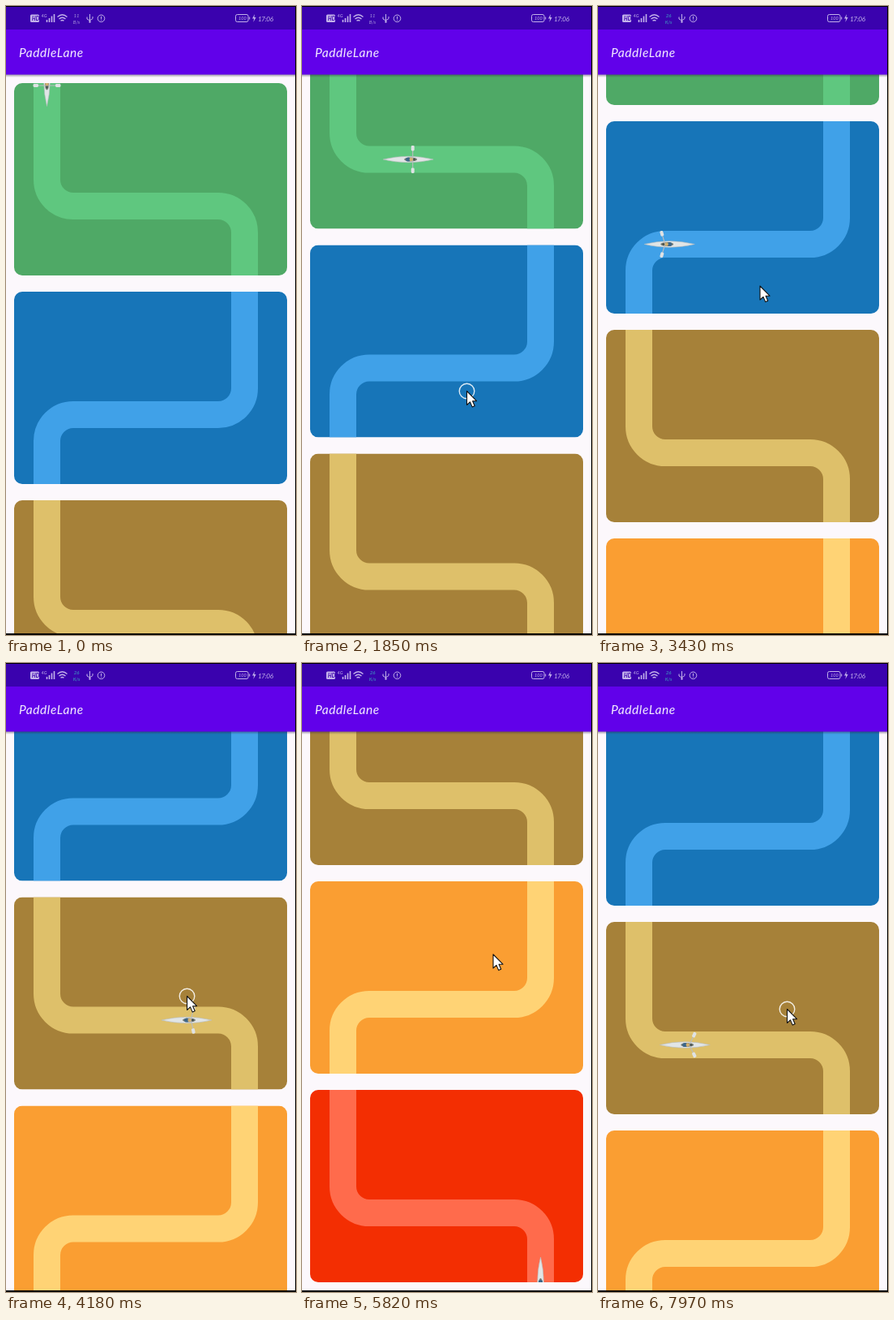
Recreate the animation shown at these times as an HTML page. Size 358 px wide and 775 px high, loop 8 s.

```html
<!DOCTYPE html>
<html lang="en">
<head>
<meta charset="utf-8">
<style>
  html, body { margin: 0; width: 100%; height: 100%; overflow: hidden; background: #fcf8fc; }
  svg { display: block; width: 100vw; height: 100vh; }
  text { font-family: Lato, "Open Sans", sans-serif; font-style: italic; }
</style>
</head>
<body>
<svg id="stage" viewBox="0 0 358 775">
  <defs>
    <clipPath id="cardClip"><rect width="337" height="237" rx="10"/></clipPath>
    <linearGradient id="shade" x2="0" y2="1">
      <stop offset="0" stop-color="#322646" stop-opacity=".5"/>
      <stop offset="1" stop-color="#322646" stop-opacity="0"/>
    </linearGradient>
    <g id="oar">
      <path d="M0 0V14" stroke="#b9bcc0" stroke-width="1.1"/>
      <rect x="-2" y="10.5" width="4" height="6.5" rx="1.4" fill="#dfe2e4"/>
    </g>
  </defs>
  <rect width="358" height="775" fill="#fcf8fc"/>
  <g id="list"></g>

  <rect y="84" width="358" height="4" fill="url(#shade)"/>
  <rect y="28" width="358" height="56.5" fill="#6101ea"/>
  <rect width="358" height="29" fill="#3a02ae"/>
  <text x="16" y="63" font-size="15.5" letter-spacing=".6" fill="#f3ebff">PaddleLane</text>

  <g fill="none" stroke="#c3b2ea" stroke-width="1">
    <rect x="30" y="10.5" width="11" height="9.5" rx="1.5" fill="#c3b2ea" stroke="none"/>
    <path d="M50.5 20V17M53.5 20V15M56.5 20V12.5M59.5 20V10" stroke-width="1.6"/>
    <path d="M63.5 13.5Q69.5 8 75.5 13.5M65.5 16Q69.5 12.5 73.5 16M67.5 18.3Q69.5 16.7 71.5 18.3" stroke-width="1.3"/>
    <path d="M103.5 10V20M100 13.5V16L103.5 18L107 15.5V13"/>
    <circle cx="103.5" cy="19.5" r=".9"/>
    <circle cx="117.5" cy="15.3" r="4.3"/>
    <path d="M117.5 12.8V16.2M117.5 17.2V18"/>
    <rect x="283.5" y="10.5" width="15.5" height="9" rx="2"/>
    <path d="M300.7 13.5V16.5"/>
    <path d="M307 10L304 15.6H306.2L305.3 20L308.6 14H306.4Z" fill="#c3b2ea" stroke="none"/>
  </g>
  <g fill="#c3b2ea">
    <text x="32" y="18" font-size="6.5" font-weight="700" fill="#3a02ae">HD</text>
    <text x="43.5" y="14" font-size="5.5">4G</text>
    <text x="287" y="17.3" font-size="5.5">100</text>
    <text x="311" y="18.5" font-size="8.2" letter-spacing="-.4">17:06</text>
  </g>
  <g id="speed" text-anchor="middle">
    <text id="rate" x="87" y="14" font-size="6">11</text>
    <text id="unit" x="87" y="22" font-size="6">B/s</text>
  </g>

  <path d="M0 .5H358M357.5 0V775M0 774H358" stroke="#000" fill="none"/>
  <rect y="773" width="358" height="2"/>

  <g id="pointer">
    <circle id="touch" r="9.3" fill="none" stroke="#fff" stroke-opacity=".85" stroke-width="1.4"/>
    <path d="M0 0V17L4 13.4L6.7 19.6L9.7 18.2L7.1 12.2H12Z" fill="#fff" stroke="#111" stroke-width="1.1" stroke-linejoin="round"/>
  </g>
</svg>
<script>
const NS = "http://www.w3.org/2000/svg";
const $ = id => document.getElementById(id);
const LOOP = 8000, PITCH = 257, MAX_SCROLL = 597;
const COLORS = [
  ["#4fa966", "#5fc77f"], ["#1775b8", "#40a1e8"], ["#a68139", "#dec06a"],
  ["#fa9e32", "#ffd375"], ["#f32e02", "#ff6b4c"]
];
const RIGHTWARD = "M40.5 0V119A32.5 32.5 0 0 0 73 151.5H252A32.5 32.5 0 0 1 284.5 184V237";
const LEFTWARD = "M284.5 0V119A32.5 32.5 0 0 1 252 151.5H73A32.5 32.5 0 0 0 40.5 184V237";

// Screen refreshes: first time, last time, count
const BURSTS = [
  [0, 0, 1], [70, 1090, 10], [1150, 1850, 5], [2470, 2920, 4], [3090, 3430, 3],
  [3710, 3860, 2], [4180, 4380, 2], [4570, 4940, 3], [5190, 5190, 1], [5820, 5820, 1],
  [6230, 6540, 3], [6840, 6970, 2], [7150, 7150, 1], [7420, 7970, 4]
];
// Time, scroll offset
const SCROLL = [
  [0, 0], [180, 0], [1090, 32], [1850, 57.5], [2320, 57.5], [2770, 105], [3430, 210],
  [3710, 250], [4180, 320.5], [4940, 516.5], [5190, 595], [5820, 597], [6100, 597],
  [6540, 568], [6840, 528], [7150, 475], [7420, 405], [7970, 290]
];
// Time, pointer x, pointer y
const POINTER = [
  [70, 204, 532], [180, 204, 532], [1090, 204, 500], [1850, 203.5, 474.5],
  [2320, 203.5, 474.5], [2770, 202.5, 432.5], [3430, 200, 345], [3710, 222, 480],
  [4180, 223.5, 410.5], [4940, 213, 282], [5190, 212, 278], [5820, 236, 359],
  [6230, 240, 375], [6540, 250, 425], [6840, 253.5, 464.5], [7150, 251, 516],
  [7420, 238, 316], [7970, 233.5, 426.5]
];
const TOUCHES = [[180, 3400], [3700, 4700], [6200, 7100], [7420, 8000]];

function add(parent, tag, attrs) {
  const el = document.createElementNS(NS, tag);
  for (const k in attrs) el.setAttribute(k, attrs[k]);
  return parent.appendChild(el);
}

const lanes = COLORS.map(([fill, stroke], i) => {
  const place = add($("list"), "g", { transform: `translate(10 ${95 + i * PITCH})` });
  const card = add(place, "g", { "clip-path": "url(#cardClip)" });
  add(card, "rect", { width: 337, height: 237, fill });
  const track = add(card, "path", {
    d: i % 2 ? LEFTWARD : RIGHTWARD, fill: "none", stroke, "stroke-width": 33
  });
  return { card, track };
});
const laneLength = lanes[0].track.getTotalLength();

const boat = add(lanes[0].card, "g", {});
add(boat, "path", {
  d: "M-31 0Q0 -7.6 31 0Q0 7.6 -31 0Z", fill: "#e1e5e6", stroke: "#b5babd", "stroke-width": .6
});
add(boat, "ellipse", { cx: 3, rx: 8, ry: 2.5, fill: "#777d78" });
const oars = [1, -1].map(() => add(boat, "use", { href: "#oar" }));
add(boat, "ellipse", { cx: 0, rx: 3, ry: 2.6, fill: "#3d6688" });
add(boat, "circle", { cx: 3.6, r: 2.2, fill: "#d2b070" });
add(boat, "circle", { cx: 7.5, r: 1.5, fill: "#4c5650" });

function sample(keys, t) {
  let i = 0;
  while (i < keys.length - 1 && keys[i + 1][0] <= t) i++;
  const a = keys[i], b = keys[i + 1];
  if (!b || t <= a[0]) return a.slice(1);
  const k = (t - a[0]) / (b[0] - a[0]);
  return a.slice(1).map((v, j) => v + (b[j + 1] - v) * k);
}

function refreshTime(t) {
  let [first, last, n] = BURSTS[0];
  for (const burst of BURSTS) if (burst[0] <= t) [first, last, n] = burst;
  if (n < 2) return first;
  const step = (last - first) / (n - 1);
  return first + step * Math.min(n - 1, Math.floor((t - first) / step + 1e-6));
}

function moveBoat(scroll) {
  const dist = scroll / MAX_SCROLL * laneLength * lanes.length;
  const i = Math.min(lanes.length - 1, Math.floor(dist / laneLength));
  const { card, track } = lanes[i];
  const s = dist - i * laneLength;
  const p = track.getPointAtLength(s);
  const a = track.getPointAtLength(Math.max(0, s - .5));
  const b = track.getPointAtLength(Math.min(laneLength, s + .5));
  const angle = Math.atan2(b.y - a.y, b.x - a.x) * 180 / Math.PI;
  if (boat.parentNode !== card) card.appendChild(boat);
  boat.setAttribute("transform", `translate(${p.x} ${p.y - (dist < 1 ? 2.5 : 0)}) rotate(${angle})`);
  const tilt = 26 * Math.sin(Math.PI * dist / 31) ** 2;
  oars[0].setAttribute("transform", `translate(5.5 0) rotate(${-tilt})`);
  oars[1].setAttribute("transform", `translate(5.5 0) scale(1 -1) rotate(${-tilt})`);
}

function draw(time) {
  const t = refreshTime(time);
  const [scroll] = sample(SCROLL, t);
  $("list").setAttribute("transform", `translate(0 ${-scroll})`);
  moveBoat(scroll);

  const [x, y] = sample(POINTER, t);
  $("pointer").setAttribute("transform", `translate(${x} ${y})`);
  $("pointer").setAttribute("visibility", t < 70 ? "hidden" : "visible");
  $("touch").setAttribute("opacity", TOUCHES.some(([a, b]) => t >= a && t < b) ? 1 : 0);

  const busy = t >= 2470;
  $("rate").textContent = busy ? "26" : "11";
  $("unit").textContent = busy ? "K/s" : "B/s";
  $("speed").setAttribute("fill", busy ? "#3d80bd" : "#a996dc");
  $("speed").setAttribute("font-weight", busy ? 700 : 400);
}

let start;
function loop(now) {
  start ??= now;
  draw((now - start) % LOOP);
  requestAnimationFrame(loop);
}
draw(0);
requestAnimationFrame(loop);
</script>
</body>
</html>
```
